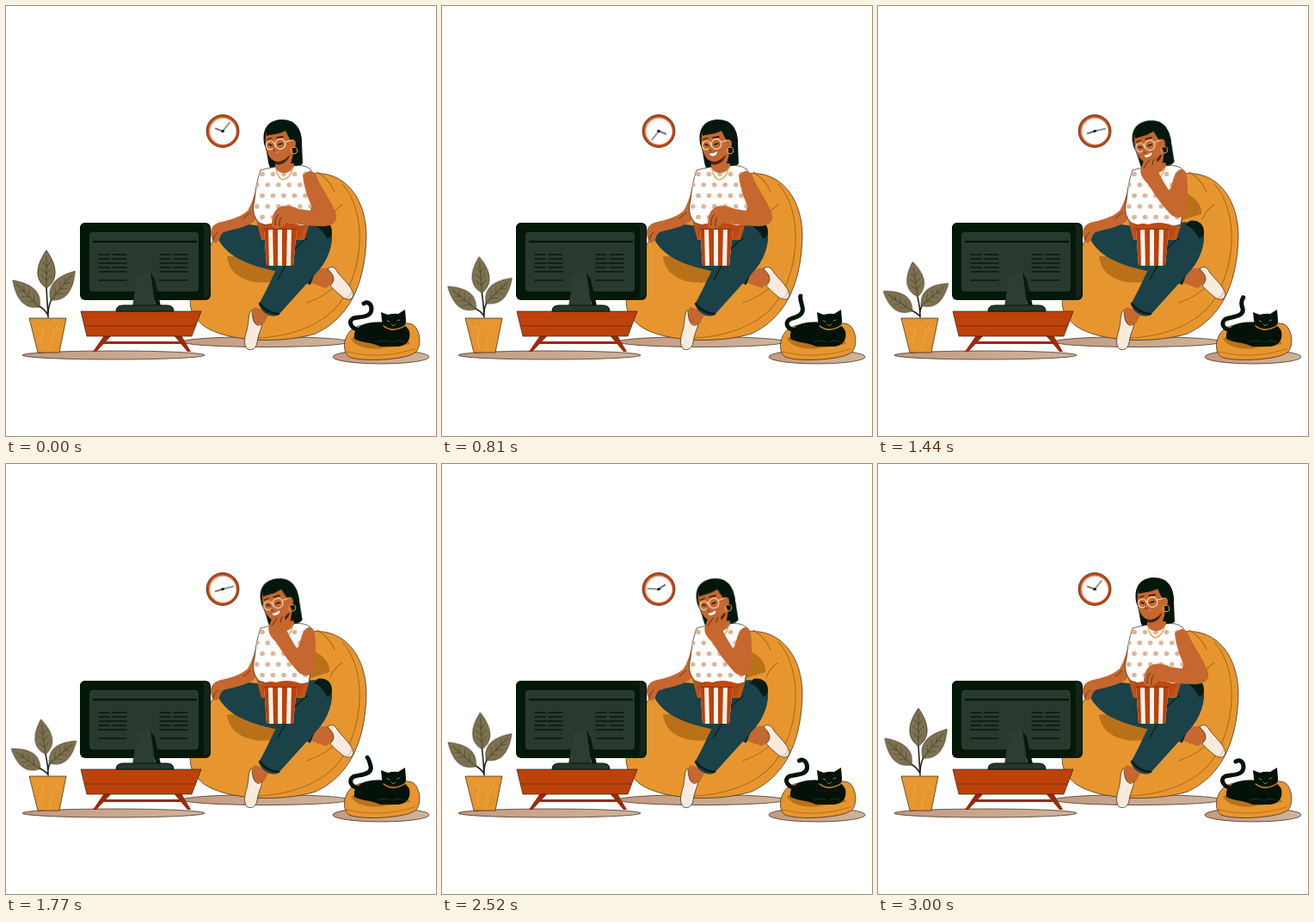
Animation of 500x500 px, one loop 3180 ms. Source, as an HTML page:

```html
<!DOCTYPE html>
<html lang="en">
<head>
<meta charset="utf-8">
<title>Evening at home</title>
<style>
html, body { margin: 0; width: 100%; height: 100%; overflow: hidden; background: #fff; }
svg { display: block; width: 100vw; height: 100vh; }
.edge { stroke: #2b2014; stroke-width: .7; }
.skin { fill: #c5672f; }
.jeans { fill: #1a4248; }
.bag { fill: #e7962f; }
.shade { fill: #b97119; }
.line { fill: none; stroke-linecap: round; stroke-linejoin: round; }
.move { animation: 3180ms linear infinite; }

/* Sway out until half time, back by 3 s, then rest */
.hour { transform-origin: 252px 145.5px; animation-name: hour; }
.minute { transform-origin: 252px 145.5px; animation-name: minute; }
@keyframes hour { 0%, 94.3%, 100% { transform: rotate(-70deg); } 51% { transform: rotate(292deg); } }
@keyframes minute { 0%, 94.3%, 100% { transform: rotate(39deg); } 51% { transform: rotate(-323deg); } }

.leaf { animation-name: leaf; }
@keyframes leaf {
  0%, 94.3%, 100% { transform: translate(var(--x), var(--y)) rotate(var(--a)); }
  50% { transform: translate(var(--x2), var(--y2)) rotate(var(--a2)) scale(.96, .92); }
}
.stems { animation-name: stems; }
@keyframes stems {
  0%, 94.3%, 100% { d: path("M49 362Q48 345 47 328M49 360Q46 353 37 348M49 359Q49 349 53 341"); }
  50% { d: path("M49 362Q49 350 46 339M49 361Q45 357 38 354M49 360Q48 354 51 349"); }
}

.tail { animation-name: tail; }
@keyframes tail {
  0%, 94.3%, 100% { d: path("M412 377C401 376 397 366 404 363C414 361 425 362 425 352C425 346 420 343 416 346"); }
  12% { d: path("M412 377C401 377 397 368 404 364C413 361 422 359 421 351C420 346 418 342 414 342"); }
  26% { d: path("M412 377C402 377 397 368 405 364C414 361 421 359 419 350C418 345 416 341 417 337"); }
  46% { d: path("M412 377C401 377 398 368 404 364C413 361 427 361 424 351C422 346 423 342 425 339"); }
  66% { d: path("M412 377C401 376 397 367 404 363C413 361 426 361 424 351C423 345 419 342 415 344"); }
}

.head { transform-origin: 328px 185px; animation-name: head; animation-timing-function: ease-in-out; }
@keyframes head { 0%, 29%, 93%, 100% { transform: none; } 43%, 81% { transform: rotate(-7deg); } }
.arm { animation-name: arm; animation-timing-function: ease-in-out; }
@keyframes arm {
  0%, 29%, 93%, 100% { d: path("M345 197C354 188 360 192 363 203C371 218 380 230 384 243C386 253 376 257 364 256C350 256 338 253 326 252C322 258 314 261 309 256C309 248 310 240 316 235C324 230 334 233 340 236C348 237 354 238 358 238C352 226 347 214 345 197Z"); }
  43%, 81% { d: path("M345 197C350 187 357 188 359 197C361 212 360 225 358 238C356 247 348 248 341 243C333 235 323 222 314 207C306 200 303 192 307 186C308 180 312 176 318 174C324 174 326 182 325 190C328 198 333 206 338 214C342 212 341 206 345 197Z"); }
}
.fingers { animation-name: fingers; animation-timing-function: ease-in-out; }
@keyframes fingers {
  0%, 29%, 93%, 100% { d: path("M313 255Q312 248 316 243M318 256Q317 250 320 246"); }
  43%, 81% { d: path("M309 188Q313 183 315 179M319 184Q319 181 321 178"); }
}
.smile { transform-origin: 316px 170px; animation-name: smile; }
@keyframes smile { 0%, 94.3%, 100% { transform: scale(.7, .15); } 8%, 86% { transform: none; } }
</style>
</head>
<body>
<svg viewBox="0 0 500 500">
  <defs>
    <pattern id="dots" x="298" y="202" width="12.500" height="25" patternUnits="userSpaceOnUse">
      <g fill="#dcb497"><circle cx="6.250" cy="6" r="2.800"/><circle cx="0" cy="18.500" r="2.800"/><circle cx="12.500" cy="18.500" r="2.800"/></g>
    </pattern>
    <path id="shirt" d="M296 191C305 188 312 188 316 186H333C341 185 350 185 355 191C358 204 359 218 356 230L352 254C335 259 309 258 294 252C288 245 286 237 289 226C290 214 292 202 296 191Z"/>
    <g id="leaf">
      <path d="M0 0C-13 -9 -14 -24 0 -44C14 -24 13 -9 0 0Z" fill="#7e7250" class="edge"/>
      <path d="M0 0V-37M0 -9L-6 -15M0 -9L6 -15M0 -17L-6 -23M0 -17L6 -23M0 -25L-4 -30M0 -25L4 -30" class="line" stroke="#40402a" stroke-width=".8"/>
    </g>
    <g id="vents" class="line" stroke="#06190c" stroke-width="1.400">
      <path d="M0 0H12M16 0H32M0 5H12M16 5H32M0 10H32M0 15H12M16 15H32M0 20H32M0 30H32"/>
    </g>
    <clipPath id="cup"><path d="M300 259H338L334 302H303Z"/></clipPath>
    <linearGradient id="floor"><stop stop-color="#c49a80"/><stop offset="1" stop-color="#cfb49c"/></linearGradient>
  </defs>

  <!-- floor -->
  <g fill="url(#floor)" class="edge">
    <ellipse cx="302" cy="390.500" rx="97" ry="6"/>
    <ellipse cx="125" cy="406" rx="106" ry="5"/>
    <ellipse cx="436" cy="408" rx="56" ry="8"/>
  </g>

  <!-- clock -->
  <circle cx="252" cy="145.500" r="19" fill="#c4470f" class="edge"/>
  <circle cx="252" cy="145.500" r="16" fill="#dcb09a"/>
  <circle cx="252.500" cy="146" r="15" fill="#fff"/>
  <g class="line" stroke="#07170c">
    <path class="move hour" d="M252 147V136.500" stroke-width="1.200"/>
    <path class="move minute" d="M252 147V132.500" stroke-width=".9"/>
  </g>
  <circle cx="252" cy="145.500" r="1.600" fill="#07170c"/>

  <!-- bean bag -->
  <path d="M354 195C395 190 420 226 419 270C417 329 396 364 360 381C321 393 257 391 230 372C213 358 211 345 218 329C226 309 230 284 245 268L300 235Z" class="bag edge"/>
  <path d="M391 207C421 240 416 310 386 348C365 373 325 387 283 386M391 231Q382 236 377 248M362 193Q377 203 382 216M350 345Q373 337 385 323" class="line" stroke="#ad6a17" stroke-width="1.100"/>
  <path d="M354 215C366 221 377 229 376 242L350 250Z" class="shade"/>
  <path d="M257 291C258 309 276 325 309 321L330 290Z" class="shade"/>

  <!-- crossed legs -->
  <path d="M355 307L377 304L385 318L372 328L352 321Z" class="skin"/>
  <path d="M374 306C378 301 383 304 386 310C393 319 402 326 404 335C404 341 398 343 392 339C386 334 380 329 377 325C384 319 381 312 374 306Z" fill="#f8eadd" class="edge"/>
  <path d="M394 340Q402 338 402 331" class="line" stroke="#d7a98c" stroke-width="1"/>
  <path d="M288 350L307 356L300 369L285 371Z" class="skin"/>
  <path d="M286 353C281 357 283 367 280 377C277 386 276 395 281 399C286 401 291 398 292 391C293 382 297 376 298 369C292 375 286 369 286 353Z" fill="#f8eadd" class="edge"/>
  <path d="M255 251C245 250 242 262 249 275C260 292 282 302 318 309L353 324L360 307L326 287L340 258L300 256Z" class="jeans"/>
  <path d="M353 323L359 308" class="line" stroke="#0a2421" stroke-width="2.400"/>
  <path d="M337 257C350 249 372 249 378 260C382 274 375 295 363 308L317 359C308 364 297 356 294 347C306 325 314 305 324 288Z" class="jeans"/>
  <path d="M362 250C371 248 379 253 379 262C379 267 376 271 373 270C370 264 365 257 358 255Z" fill="#071c14"/>
  <path d="M295 346Q303 357 317 358" class="line" stroke="#071c17" stroke-width="2.400"/>
  <path d="M350 270Q336 279 329 295L316 318" class="line" stroke="#071c17" stroke-width="1.200"/>

  <!-- resting arm -->
  <path d="M297 193C291 205 289 226 281 238C272 246 260 249 250 251C241 253 237 259 238 266C239 272 242 277 245 275C250 271 248 266 253 263C266 259 282 257 290 249C296 241 300 228 302 215Z" class="skin"/>
  <path d="M276 247L284 240M241 272Q242 266 246 263" class="line" stroke="#602b13" stroke-width=".9"/>

  <!-- torso -->
  <g class="move head">
    <path d="M300 160C297 140 308 132 321 132C337 132 344 143 344 160L345 183C342 188 334 187 328 186L307 188C304 182 305 173 300 160Z" fill="#04170c"/>
  </g>
  <path d="M291 249H354L347 272H297Z" fill="#bd561b"/>
  <use href="#shirt" fill="#fff" class="edge"/>
  <use href="#shirt" fill="url(#dots)"/>
  <path d="M313 172L333 167L335 186C331 196 318 197 313 188Z" class="skin"/>
  <path d="M312 178L330 173C328 181 321 186 313 184Z" fill="#4a2310"/>
  <path d="M314 190Q317 202 323 202Q331 199 333 189" class="line" stroke="#dfa450" stroke-width="1.300"/>

  <!-- head -->
  <g class="move head">
    <path d="M303 146C300 158 302 169 307 176C312 183 321 182 327 176L333 169C340 162 337 153 332 151L327 141H309Z" class="skin"/>
    <path d="M303 151C302 139 310 133 321 133C336 133 343 142 344 157V183H331C334 174 335 169 333 167L331 156C328 152 327 149 325 145C318 149 310 149 303 151Z" fill="#04170c"/>
    <ellipse cx="334" cy="160" rx="3" ry="4.500" class="skin"/>
    <circle cx="335" cy="168" r="3.800" class="line" stroke="#e2a64b" stroke-width="1.100"/>
    <path d="M304 155L309 153.500M315 153L322 152" class="line" stroke="#1d1009" stroke-width="1.300"/>
    <path d="M306 161L309 162M317 161L321 160" class="line" stroke="#1d1009" stroke-width="1.500"/>
    <g class="line" stroke="#f4dfbd" stroke-width="1.200">
      <circle cx="307.500" cy="162" r="5"/><circle cx="319" cy="160.500" r="5.800"/>
      <path d="M325 158L333 156"/>
    </g>
    <path d="M312 162L310.500 168L313 168.500" class="line" stroke="#6b3014" stroke-width=".9"/>
    <path class="move smile" d="M310 171Q316 172 321 168Q320 175 315 175Q311 175 310 171Z" fill="#fff" stroke="#71301a" stroke-width=".6"/>
  </g>

  <!-- snack -->
  <path d="M296 258Q304 251 314 254Q329 249 347 257L343 269H299Z" fill="#bd4a12"/>
  <path class="move arm skin"/>
  <path class="move fingers line" stroke="#612b13" stroke-width="1"/>
  <g clip-path="url(#cup)">
    <path d="M299 257H339V303H299Z" fill="#fff4e8"/>
    <path d="M299 257H305L306 303H302ZM310 257H316V303H311ZM321 257H327L326 303H321ZM332 257H339L335 303H331Z" fill="#bd3f0d"/>
    <path d="M300 258H338V260H300Z" fill="#8f300c"/>
  </g>

  <!-- television -->
  <path d="M114 383H123L105 402H101ZM195 383H204L215 402H211ZM110 390H205L207 393H108Z" fill="#9b2a0a"/>
  <path d="M87 355H227L216 384H94Z" fill="#bd420a" class="edge"/>
  <path d="M91 372H221" stroke="#842a09"/>
  <rect x="86" y="252" width="152" height="90" rx="6" fill="#041807"/>
  <path d="M224 254H232Q237 254 237 260V332Q237 339 229 340H224Z" fill="#14241a"/>
  <rect x="86" y="252" width="144" height="89" rx="6" fill="#041807"/>
  <rect x="97" y="263" width="127" height="69" rx="4" fill="#2a392f"/>
  <path d="M102 274H221" class="line" stroke="#06190c" stroke-width="2.400"/>
  <use href="#vents" x="108" y="289"/>
  <use href="#vents" x="179" y="289"/>
  <path d="M153 313L167 309L174 349H147Z" fill="#2d3d33"/>
  <path d="M168 310L174 349H180L173 318Z" fill="#06190c"/>
  <path d="M128 355Q128 348 136 348H187Q195 348 195 355Z" fill="#25372b" stroke="#041807"/>

  <!-- plant -->
  <path class="move stems line" stroke="#202516" stroke-width="1.600"/>
  <use href="#leaf" class="move leaf" style="--x:47px;--y:328px;--a:0deg;--x2:46px;--y2:339px;--a2:-9deg"/>
  <use href="#leaf" class="move leaf" style="--x:39px;--y:350px;--a:-45deg;--x2:40px;--y2:355px;--a2:-57deg"/>
  <use href="#leaf" class="move leaf" style="--x:52px;--y:342px;--a:40deg;--x2:50px;--y2:349px;--a2:52deg"/>
  <path d="M27 363H70L62 403H37Z" class="bag edge"/>
  <path d="M37 374Q45 369 43 381Q39 391 44 398M51 373Q60 374 54 384Q49 392 52 400M61 368Q57 374 62 379" class="line" stroke="#eda94f" stroke-width=".9"/>

  <!-- cat -->
  <path d="M405 374C420 367 457 366 472 370C482 375 484 396 476 403C463 412 413 414 399 408C390 402 392 382 405 374Z" class="bag edge"/>
  <path d="M401 387C407 397 423 400 438 398L470 393L462 380H410Z" class="shade"/>
  <path d="M396 402Q433 412 475 399" class="line" stroke="#b97119"/>
  <path class="move tail line" stroke="#031208" stroke-width="5"/>
  <path d="M405 381C408 371 422 366 438 368C451 365 465 368 469 378C471 387 467 395 456 396H435C427 391 413 392 405 387Z" fill="#031208"/>
  <path d="M436 356L444 359Q450 357 456 358L464 353L465 365C466 373 458 377 451 377C442 377 437 372 437 365Z" fill="#031208"/>
  <path d="M439 372Q450 381 465 371" class="line" stroke="#d98a2b" stroke-width="1.300"/>
  <path d="M443 366L446 367M455 366L458 365M448 370L450 372L453 370" class="line" stroke="#71816f" stroke-width="1"/>
  <path d="M432 391Q440 387 447 391M450 391Q456 387 463 391" class="line" stroke="#2a392f" stroke-width=".9"/>
</svg>
</body>
</html>
```
